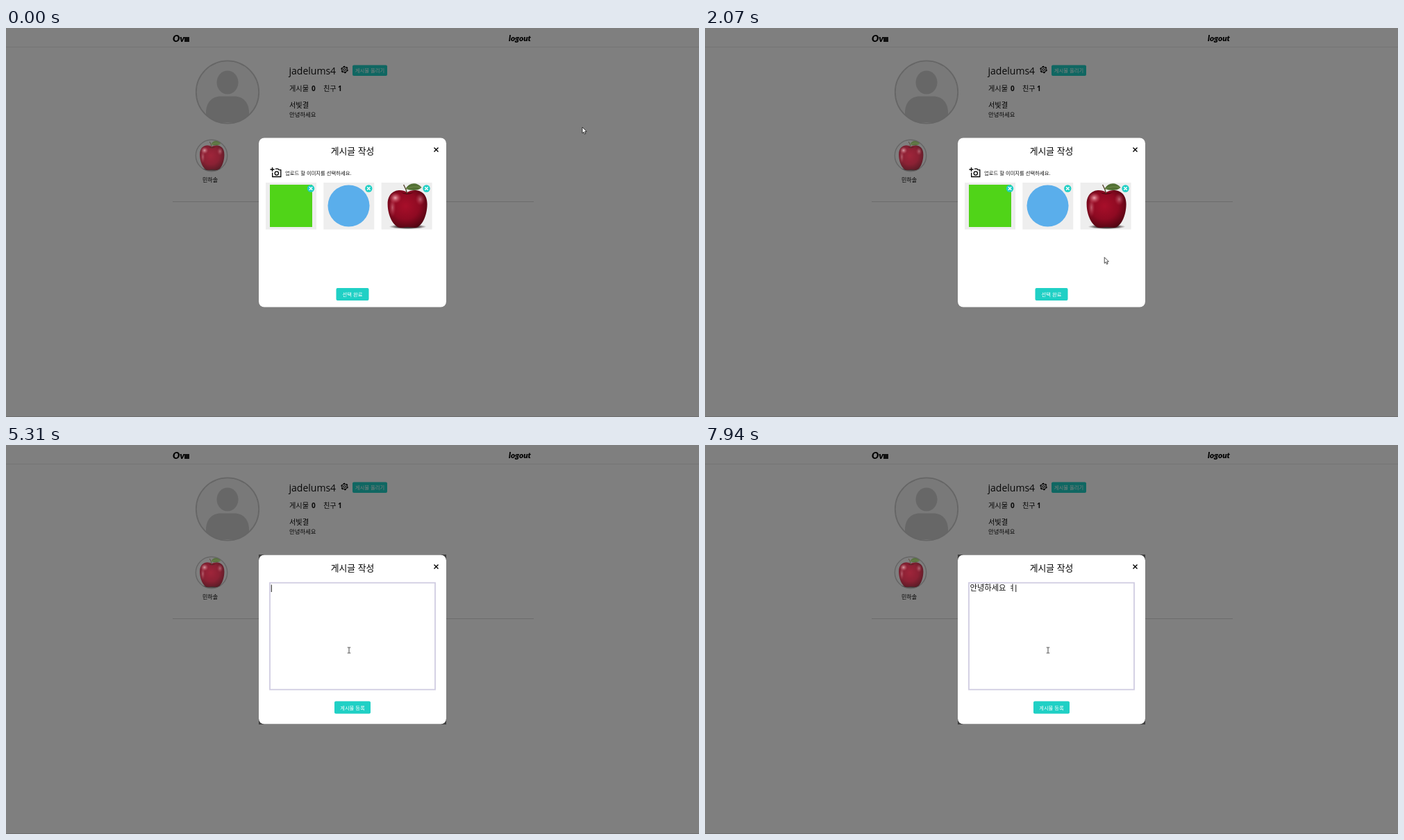
An HTML page that plays this animation: 998 px wide and 561 px high, repeating every 8 s.

```html
<!DOCTYPE html>
<html lang="ko">
<head>
<meta charset="utf-8">
<title>게시글 작성</title>
<style>
  html, body { margin: 0; width: 100%; height: 100%; overflow: hidden; background: #7f7f7f; }
  svg { display: block; width: 100vw; height: 100vh; }
  text { font-family: "Noto Sans CJK KR", "Noto Sans CJK", sans-serif; fill: #111; white-space: pre; }
  .latin { font-family: "Open Sans", "Noto Sans", sans-serif; }
  .script { font: italic 900 11.7px Lato, sans-serif; fill: #000; }
  .strong { font-weight: 500; fill: #000; }
  .bold { font-weight: 700; }
  .mid { text-anchor: middle; }
  .button { fill: #20d0c5; }
  .label { font-size: 7.3px; fill: #fff; text-anchor: middle; }
  .line { fill: none; stroke: #000; }
</style>
</head>
<body>
<svg viewBox="0 0 998 561">
  <defs>
    <radialGradient id="skin" cx=".45" cy=".42" r=".64">
      <stop offset="0" stop-color="#a80f2a"/>
      <stop offset=".55" stop-color="#8e0a22"/>
      <stop offset="1" stop-color="#4c0410"/>
    </radialGradient>
    <radialGradient id="shine">
      <stop offset="0" stop-color="#f6b8c0" stop-opacity=".9"/>
      <stop offset="1" stop-color="#d84a60" stop-opacity="0"/>
    </radialGradient>
    <radialGradient id="shade">
      <stop offset=".5" stop-color="#1c0c0e" stop-opacity=".85"/>
      <stop offset="1" stop-color="#1c0c0e" stop-opacity="0"/>
    </radialGradient>
    <!-- Fits a box of 73 by 67 -->
    <g id="apple">
      <ellipse cx="38" cy="63.500" rx="27" ry="3.500" fill="url(#shade)"/>
      <path d="M37 14C28 8 9 10 9 31C9 48 18 65 28 65C33 65 34 64 38 64C42 64 44 65 48 65C58 65 66 48 66 31C66 10 47 8 37 14Z" fill="url(#skin)"/>
      <ellipse cx="20" cy="22" rx="9" ry="8" fill="url(#shine)"/>
      <ellipse cx="16" cy="36" rx="5" ry="14" fill="url(#shine)" opacity=".5"/>
      <ellipse cx="56" cy="24" rx="7" ry="9" fill="url(#shine)" opacity=".55"/>
      <path d="M28 14Q37 20 47 14Q37 16.500 28 14Z" fill="#54050f"/>
      <path d="M37 16Q36 10 32 3" fill="none" stroke="#51402a" stroke-width="1.400"/>
      <path d="M35 9C39 0 51-2 58 7C51 13 42 11 35 9Z" fill="#527034"/>
      <path d="M36 9Q46 4 57 7" fill="none" stroke="#7f9a55" stroke-width=".7"/>
    </g>
    <g id="remove">
      <circle r="5.200" class="button"/>
      <path d="M-1.800-1.800L1.800 1.800M1.800-1.800L-1.800 1.800" stroke="#fff" stroke-width="1.500" stroke-linecap="round"/>
    </g>
    <clipPath id="friendClip"><circle cx="296" cy="184" r="22.500"/></clipPath>
    <clipPath id="avatarClip"><circle cx="319" cy="92.500" r="45"/></clipPath>
  </defs>

  <g id="page">
    <rect width="998" height="561" fill="#fff"/>
    <rect y="27" width="998" height="1" fill="#ececec"/>
    <rect y="560" width="998" height="1" fill="#dcdcdc"/>
    <text x="240" y="20" class="script" style="font-size:13.500px">Ov</text>
    <rect x="257" y="13" width="7" height="7" fill="#222"/>
    <text x="724" y="18.500" class="script">logout</text>

    <circle cx="319" cy="92.500" r="45.200" fill="#f4f4f4"/>
    <g clip-path="url(#avatarClip)" fill="#cfcfcf">
      <ellipse cx="319" cy="78.500" rx="15.500" ry="17"/>
      <path d="M288 136V122C288 107 297 98.500 309 98.500H329C341 98.500 350 107 350 122V136Z"/>
    </g>
    <circle cx="319" cy="92.500" r="45.200" fill="none" stroke="#cdcdcd" stroke-width="1.800"/>

    <text x="407.500" y="67" font-size="14" class="latin">jadelums4</text>
    <g transform="translate(487.500 60)" class="line">
      <circle r="3.700" stroke-width="1.100"/>
      <circle r="4.600" stroke-width="1.300" stroke-dasharray="2.409"/>
      <circle r="1.600" stroke-width="1"/>
    </g>
    <rect x="499" y="53.500" width="50" height="15.500" rx="2" class="button"/>
    <text x="524" y="64" class="label">게시물 올리기</text>
    <text x="408" y="91" font-size="10.200">게시물</text>
    <text x="440" y="91" font-size="10" class="bold latin">0</text>
    <text x="457" y="91" font-size="10.200">친구</text>
    <text x="478" y="91" font-size="10" class="bold latin">1</text>
    <text x="408" y="114.500" font-size="10.200" class="strong">서빛결</text>
    <text x="408" y="128" font-size="8.400">안녕하세요</text>

    <circle cx="296" cy="184" r="22.700" fill="none" stroke="#cdcdcd" stroke-width="1.500"/>
    <text x="294" y="222" font-size="8" class="strong mid">민하솔</text>
    <rect x="240" y="250" width="520" height="1" fill="#dadada"/>
    <rect width="998" height="561" opacity=".5"/>
  </g>
  <g clip-path="url(#friendClip)" opacity=".8">
    <use href="#apple" transform="translate(273.500 162) scale(.62 .66)"/>
  </g>

  <rect id="corners" x="364" y="158" width="270" height="245" fill="#404040"/>
  <rect x="364" y="158.500" width="270" height="244" rx="8" fill="#fff"/>
  <text x="499" y="181.500" font-size="12.800" class="strong mid">게시글 작성</text>
  <path d="M616.500 172.500L622.500 178.500M622.500 172.500L616.500 178.500" class="line" stroke-width="1.400"/>

  <g id="pickStep">
    <g class="line" stroke-width="1.300">
      <path d="M383.500 201V207M380.500 204H386.500"/>
      <path d="M383.700 208.500V214.500H395.800V204.700H393L391.800 203.200H388"/>
      <circle cx="389.800" cy="209.500" r="2.600"/>
    </g>
    <text x="402" y="212" font-size="7.300">업로드 할 이미지를 선택하세요.</text>
    <g fill="#eee">
      <rect x="374" y="223" width="73" height="67.500"/>
      <rect x="457.300" y="223" width="73" height="67.500"/>
      <rect x="540.600" y="223" width="73" height="67.500"/>
    </g>
    <rect x="380" y="226" width="61" height="61" fill="#50d418"/>
    <circle cx="493.500" cy="256.500" r="30" fill="#5aaeeb"/>
    <use href="#apple" x="540.600" y="223"/>
    <use href="#remove" x="439" y="231.500"/>
    <use href="#remove" x="522.300" y="231.500"/>
    <use href="#remove" x="605.500" y="231.500"/>
    <rect x="475.500" y="375" width="47" height="18" rx="2" class="button"/>
    <text x="499" y="387" class="label">선택 완료</text>
  </g>

  <g id="writeStep">
    <rect x="380" y="198.700" width="238" height="154" fill="#fff" stroke="#d0cde2" stroke-width="1.800"/>
    <text id="typed" x="381.500" y="210.300" font-size="11.300" font-weight="300"></text>
    <rect id="underline" y="211.500" height=".8" width="10"/>
    <rect id="caret" y="201.500" width=".9" height="10.500"/>
    <rect x="473" y="369.500" width="52" height="18" rx="2" class="button"/>
    <text x="499" y="381.500" class="label">게시물 등록</text>
  </g>

  <g id="pointer">
    <path id="arrow" d="M0 0V8.700L2 6.900L3.400 10L4.900 9.300L3.500 6.300H6.200Z" fill="#fff" stroke="#000" stroke-width=".7"/>
    <path id="hand" d="M-1 .8Q0-.6 1 .8V4.200Q2 3.500 2.600 4.600Q3.700 4 4 5.200Q5.200 4.800 5.200 6.200V8.500Q5 10 4.200 11.800H-1.200Q-2 9.800-3.600 7.700Q-3.600 6.200-2.200 6.800L-1 8Z" fill="#fff" stroke="#000" stroke-width=".8"/>
    <path id="beam" d="M-2.200-4H-.6L0-3.600L.6-4H2.200M-2.200 4H-.6L0 3.600L.6 4H2.200M0-3.600V3.600" fill="none" stroke="#333" stroke-width=".9"/>
  </g>
</svg>
<script>
const LOOP = 8000, SWITCH = 4800, BLINK = 520;
const $ = id => document.getElementById(id);
const show = (id, on) => $(id).style.display = on ? "" : "none";

// time, x, y of the pointer
const path = [
  [0, 830, 143], [200, 822, 160], [520, 700, 320], [760, 616, 431], [950, 616, 408],
  [1200, 606.5, 403], [1650, 594, 386], [2100, 575, 330], [2500, 596, 310],
  [2850, 848, 320], [3200, 810, 255], [3370, 714, 290], [3750, 600, 350],
  [4170, 524, 386], [4400, 517, 386.5], [4720, 517, 386.5], [4940, 494, 296]
];

// Each key press leaves this text in the field
const keys = [
  [5800, "ㅇ"], [5890, "아"], [5970, "안"], [6060, "안ㄴ"], [6140, "안녀"], [6220, "안녕"],
  [6300, "안녕ㅎ"], [6380, "안녕하"], [6470, "안녕핫"], [6550, "안녕하세"], [6640, "안녕하셍"],
  [6720, "안녕하세요"], [6930, "안녕하세요 "], [7060, "안녕하세요 ㅕ"], [7180, "안녕하세요 ㅕㅔ"],
  [7300, "안녕하세요 ㅕㅔㅣ"], [7700, "안녕하세요 ㅕㅔ"], [7880, "안녕하세요 ㅕ"]
];
const LAST_TYPED = 7300;

function pointerAt(t) {
  const i = path.findIndex(p => p[0] > t);
  if (i < 0) return path[path.length - 1].slice(1);
  const [t0, x0, y0] = path[i - 1], [t1, x1, y1] = path[i];
  const u = (t - t0) / (t1 - t0), e = u * u * (3 - 2 * u);
  return [x0 + (x1 - x0) * e, y0 + (y1 - y0) * e];
}

function drawField(t) {
  const [since, text] = keys.filter(k => k[0] <= t).pop() || [SWITCH + 80, ""];
  const typed = $("typed");
  if (typed.textContent !== text) typed.textContent = text;
  const end = 381.8 + (text ? typed.getComputedTextLength() : 0);
  $("caret").setAttribute("x", end);
  $("underline").setAttribute("x", end - 10.2);
  show("caret", Math.floor(Math.max(0, t - since) / BLINK) % 2 === 0);
  show("underline", text && !text.endsWith(" ") && t < LAST_TYPED + 300);
}

function draw(now) {
  const t = now % LOOP, writing = t >= SWITCH;
  const [x, y] = pointerAt(t);
  show("pickStep", !writing);
  show("writeStep", writing);
  show("corners", writing);
  if (writing) drawField(t);

  const onButton = !writing && x > 475 && x < 523 && y > 375 && y < 393;
  const onField = writing && y < 353;
  show("hand", onButton);
  show("beam", onField);
  show("arrow", !onButton && !onField);
  $("pointer").setAttribute("transform", `translate(${x} ${y})`);
  requestAnimationFrame(() => draw(performance.now() - start));
}
const start = performance.now();
draw(0);
</script>
</body>
</html>
```
